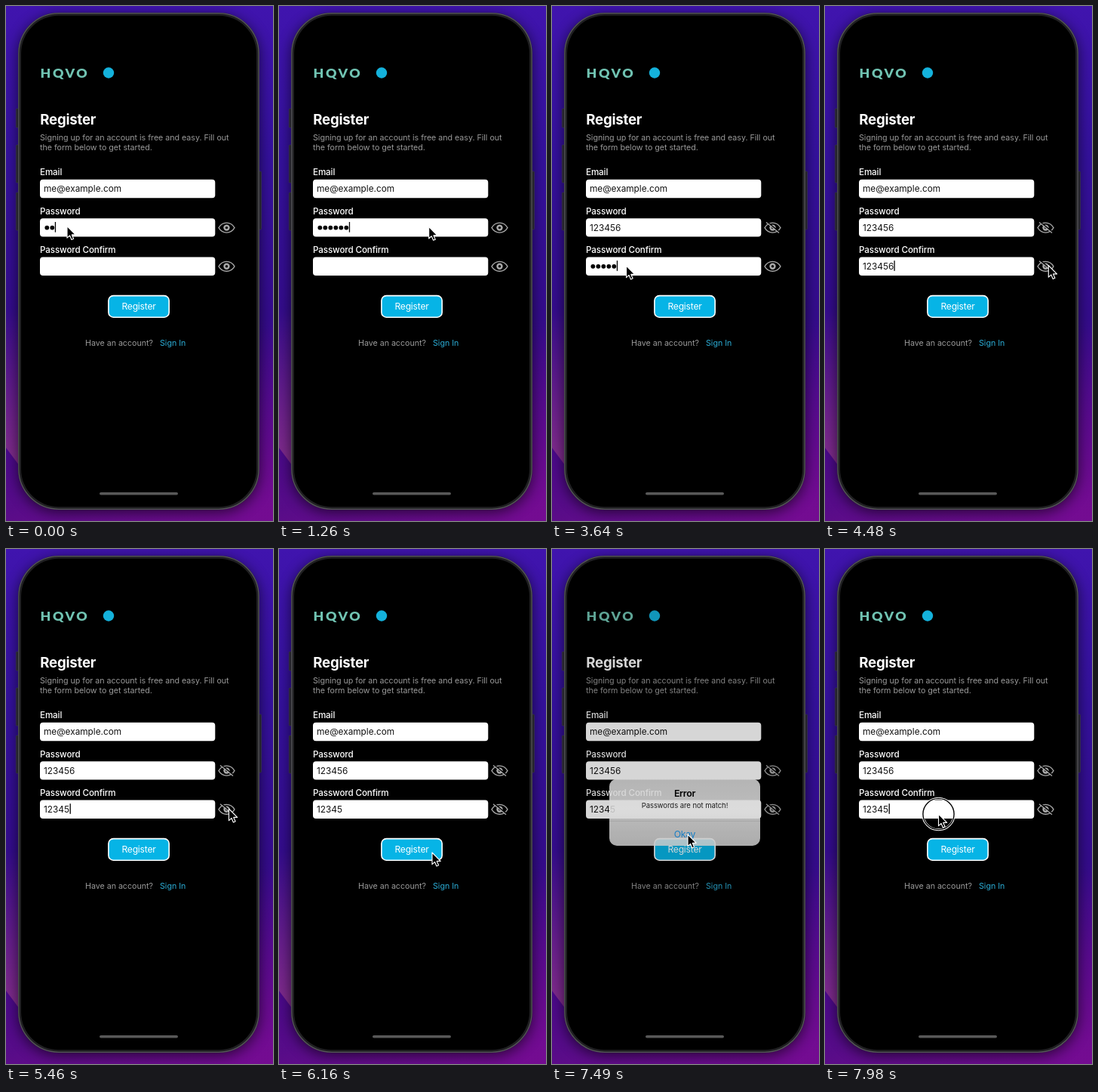
Animation of 354 by 682 pixels, one loop 8000 ms. Source, as an HTML page:

```html
<!DOCTYPE html>
<html lang="en">
<head>
<meta charset="utf-8">
<title>Register form</title>
<style>
  html, body { margin: 0; height: 100%; overflow: hidden; background: #2c0d84; }
  svg { display: block; width: 100vw; height: 100vh; font-family: Inter, sans-serif; }
  .logo { font: 900 17.8px Lato, sans-serif; letter-spacing: 2.6px; fill: #70c3b2; }
  .title { font-size: 18.6px; font-weight: 700; letter-spacing: -.2px; fill: #fff; }
  .help { font-size: 10.7px; letter-spacing: -.03px; fill: #999; }
  .label { font-size: 11.6px; font-weight: 500; letter-spacing: -.1px; fill: #fff; }
  .value { font-size: 11.8px; fill: #111; }
  .button { font-size: 12.1px; letter-spacing: -.2px; fill: #fff; }
  .middle { text-anchor: middle; }
  .dots { stroke: #000; stroke-width: 5.8; stroke-linecap: round; stroke-dasharray: 0 7; }
</style>
</head>
<body>
<svg viewBox="0 0 354 682" preserveAspectRatio="none">
  <defs>
    <linearGradient id="wall" x2="0" y2="1">
      <stop offset="0" stop-color="#4014ae"/>
      <stop offset=".3" stop-color="#34119c"/>
      <stop offset=".6" stop-color="#340c8c"/>
      <stop offset=".85" stop-color="#48098a"/>
      <stop offset="1" stop-color="#5a0c88"/>
    </linearGradient>
    <linearGradient id="glow" x2="0" y2="1">
      <stop offset="0" stop-color="#86308c" stop-opacity="0"/>
      <stop offset="1" stop-color="#86308c"/>
    </linearGradient>
    <linearGradient id="corner" gradientUnits="userSpaceOnUse" x1="240" y1="500" x2="354" y2="660">
      <stop offset="0" stop-color="#7a0c94" stop-opacity="0"/>
      <stop offset="1" stop-color="#7a0c94" stop-opacity=".8"/>
    </linearGradient>
    <linearGradient id="sheet" x2="0" y2="1">
      <stop offset="0" stop-color="#d4d4d4"/>
      <stop offset=".45" stop-color="#dedede"/>
      <stop offset="1" stop-color="#cacaca"/>
    </linearGradient>
    <filter id="blur"><feGaussianBlur stdDeviation="9"/></filter>
    <g id="eye" fill="none" stroke="#a8a8a8" stroke-width="1.3">
      <path d="M-10.5 0C-5.5-8.6 5.5-8.6 10.5 0C5.5 8.6-5.5 8.6-10.5 0Z"/>
      <circle r="4.2" fill="#a8a8a8" stroke="none"/>
      <circle r="1.7" fill="#000" stroke="none"/>
    </g>
    <g id="slash" fill="none" stroke-width="1.3">
      <path d="M-7.2-7.6L9.6 6" stroke="#000" stroke-width="1.6"/>
      <path d="M-8.5-7L8.5 7" stroke="#a8a8a8"/>
    </g>
  </defs>

  <rect width="354" height="682" fill="url(#wall)"/>
  <path d="M0 400H30V625L0 585Z" fill="url(#glow)"/>
  <rect width="354" height="682" fill="url(#corner)"/>
  <rect x="16" y="13" width="320" height="658" rx="54" opacity=".6" filter="url(#blur)"/>

  <g fill="#25242c" stroke="#3c3a48" stroke-width=".6">
    <rect x="13.3" y="136" width="5" height="25" rx="1.2"/>
    <rect x="13.3" y="184" width="5" height="50" rx="1.2"/>
    <rect x="13.3" y="247" width="5" height="50" rx="1.2"/>
    <rect x="333.5" y="219" width="5" height="77" rx="1.2"/>
  </g>
  <rect x="16" y="8.8" width="320" height="658.4" rx="54" fill="#202022"/>
  <rect x="16.9" y="9.7" width="318.2" height="656.6" rx="53" fill="none" stroke="#56565a" stroke-width="1.3"/>
  <rect x="20" y="12.8" width="312" height="650.4" rx="50"/>

  <text class="logo" x="45.5" y="95">HQVO</text>
  <circle cx="136" cy="88.5" r="7.2" fill="#14b2dc"/>
  <text class="title" x="45.3" y="157">Register</text>
  <text class="help" x="45" y="178.3">Signing up for an account is free and easy. Fill out</text>
  <text class="help" x="45" y="191.3">the form below to get started.</text>

  <g class="label">
    <text x="45" y="224.3">Email</text>
    <text x="45" y="276">Password</text>
    <text x="45" y="327.4">Password Confirm</text>
  </g>
  <g fill="#fff">
    <rect x="45" y="229.8" width="232.3" height="24.4" rx="4"/>
    <rect x="45" y="281.2" width="232.3" height="24.4" rx="4"/>
    <rect x="45" y="332.5" width="232.3" height="24.4" rx="4"/>
  </g>
  <text class="value" x="50" y="246.2">me@example.com</text>
  <g id="fields"></g>

  <rect x="135.9" y="383.6" width="80.3" height="28.6" rx="6.5" fill="#06b4e6" stroke="#fff" stroke-width="1.6"/>
  <text class="button middle" x="176" y="402.4">Register</text>
  <text class="help" x="105" y="450.3">Have an account?</text>
  <text class="help" x="204" y="450.3" style="fill:#2badd6">Sign In</text>

  <rect id="dim" x="22" y="15" width="308" height="646" rx="48" opacity="0"/>
  <rect x="124" y="644" width="104" height="3.6" rx="1.8" fill="#585858"/>
  <g id="dialog" class="middle" opacity="0">
    <rect x="76" y="304.5" width="200" height="88.5" rx="10" fill="url(#sheet)"/>
    <path d="M76 360.3H276" stroke="#b4b4b4" stroke-width=".6"/>
    <text x="176" y="328" font-size="12.4" font-weight="600" letter-spacing="-.3">Error</text>
    <text x="176" y="342.6" font-size="9.5" letter-spacing="-.06">Passwords are not match!</text>
    <text x="176" y="381.6" font-size="12.2" letter-spacing="-.3" fill="#1a94e8">Okay</text>
  </g>

  <g id="pointer">
    <g id="ring" fill="none">
      <circle r="20.8" stroke="#fff" stroke-width="3"/>
      <circle r="20.6" stroke="#000" stroke-width="1.4"/>
    </g>
    <path transform="scale(1.12)" d="M0 0V14L3.2 11.1L5.3 16L7.7 15L5.6 10.2H10Z" stroke="#fff" stroke-linejoin="round"/>
  </g>
</svg>
<script>
const LOOP = 8000, STEP = 70;
const $ = id => document.getElementById(id);
const between = (t, a, b) => t >= a && t < b;
const ramp = (t, a, b) => Math.min(1, Math.max(0, (t - a) / (b - a)));
const ease = p => p < .5 ? 4 * p ** 3 : 1 - 4 * (1 - p) ** 3;

// start, end, target x, target y
const moves = [
  [1000, 1500, 292, 293], [1820, 2240, 98.5, 344], [3640, 4130, 296.3, 343.5],
  [4970, 5250, 295.5, 344], [5530, 6160, 203, 402], [6640, 7000, 187, 386],
  [7000, 7140, 180, 378], [7530, 7840, 150.5, 351]
];
const presses = [[1540, 1680], [2330, 2470], [4270, 4410], [6230, 6370], [7280, 7420], [7900, 8000]];

function makeField(y) {
  const group = document.createElementNS('http://www.w3.org/2000/svg', 'g');
  group.innerHTML = `<text class="value" x="50" y="${y + 4.2}"></text>
    <path class="dots"/>
    <rect y="${y - 7.6}" width="1.3" height="13.6"/>
    <g transform="translate(292.5 ${y})"><use href="#eye"/><use href="#slash"/></g>`;
  $('fields').append(group);
  const [text, dots, caret, eye] = group.children;
  return (length, plain, caretAlpha) => {
    text.textContent = plain ? '123456'.slice(0, length) : '';
    dots.setAttribute('d', plain || !length ? '' : `M54.3 ${y}h${7 * length - 6}`);
    caret.setAttribute('x', plain ? 50.3 + 6.85 * length : 50.8 + 7 * length);
    caret.setAttribute('opacity', caretAlpha);
    eye.lastChild.setAttribute('visibility', plain ? 'visible' : 'hidden');
  };
}
const password = makeField(293.6), confirmation = makeField(344.8);

const typed = (t, times) => times.filter(time => t >= time).length;

function confirmCaret(t) {
  if (t < 2450) return 0;
  if (t < 5390) return 1 - ramp(t, 4900, 5250);
  if (t < 6230) return 1 - ramp(t, 5880, 6150);
  return t >= 7950 ? 1 : 0;
}

function draw(t) {
  password(2 + typed(t, [140, 350, 630, 840]), t >= 1680, t < 2450 ? 1 : 0);
  const length = typed(t, [2660, 2940, 3150, 3360, 3640, 3850]) - (t >= 5460);
  confirmation(length, t >= 4410, confirmCaret(t));

  const shown = ramp(t, 6370, 6550), hidden = ramp(t, 7420, 7720) ** 1.3;
  const scale = 1 + .15 * (1 - shown) ** 2;
  $('dim').setAttribute('opacity', .19 * shown * (1 - hidden));
  $('dialog').setAttribute('opacity', shown * (1 - hidden));
  $('dialog').setAttribute('transform', `translate(176 348.7) scale(${scale}) translate(-176 -348.7)`);

  let x = 81, y = 291.5;
  for (const [start, end, toX, toY] of moves) {
    const p = ease(ramp(t, start, end));
    x += (toX - x) * p;
    y += (toY - y) * p;
  }
  $('pointer').setAttribute('transform', `translate(${x} ${y})`);
  const pressed = presses.some(([start, end]) => between(t, start, end));
  $('ring').setAttribute('visibility', pressed ? 'visible' : 'hidden');
}

const origin = performance.now();
function tick() {
  const t = (performance.now() - origin) % LOOP;
  draw(Math.floor(t / STEP) * STEP);
  requestAnimationFrame(tick);
}
tick();
</script>
</body>
</html>
```
